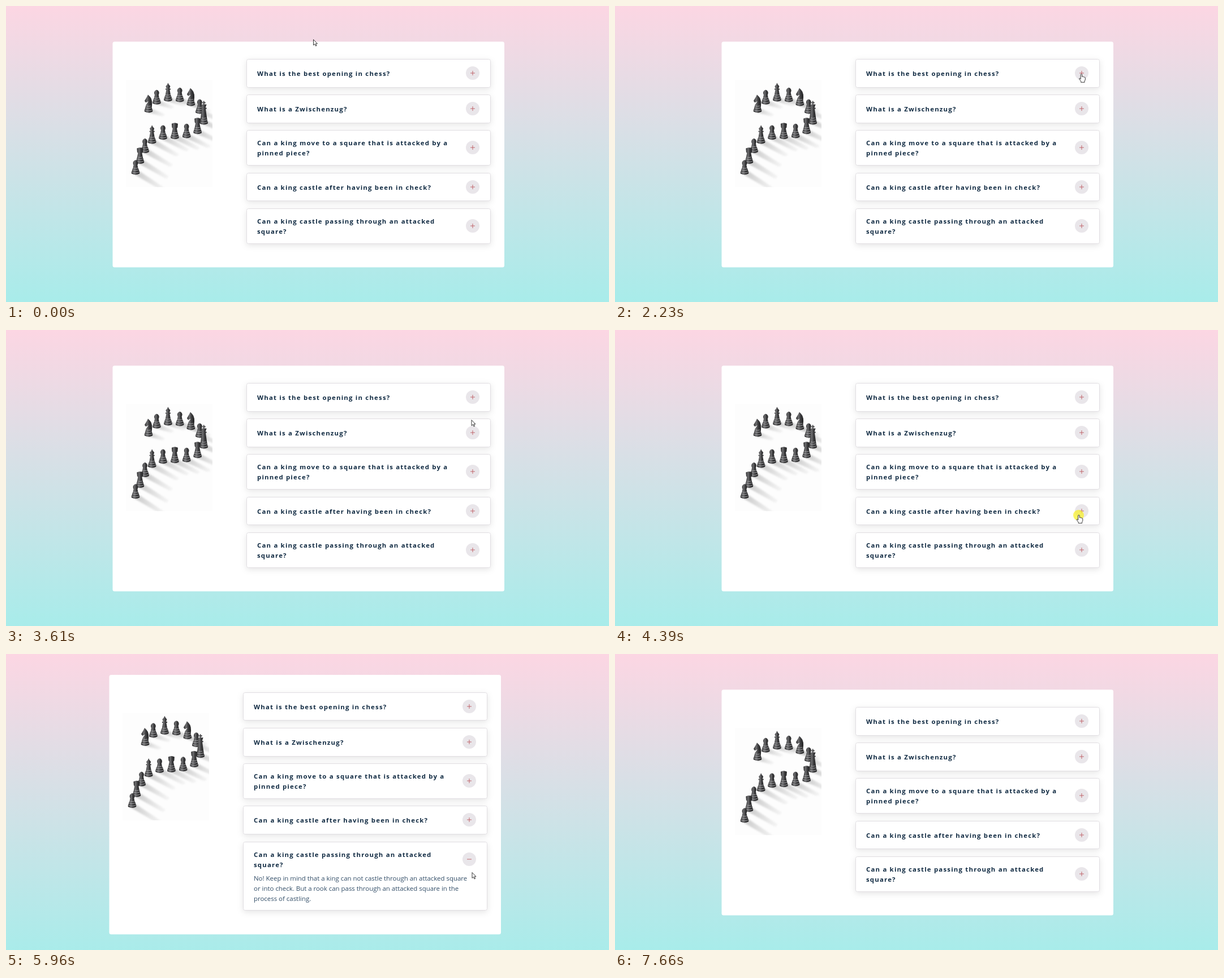
An HTML page that plays this animation: 1066 px wide and 525 px high, repeating every 7890 ms.

```html
<!DOCTYPE html>
<html lang="en">
<head>
<meta charset="utf-8">
<title>Chess questions</title>
<style>
  html, body { margin: 0; width: 100%; height: 100%; overflow: hidden; }
  svg { display: block; width: 1066px; height: 525px; }
  text { font-family: "Open Sans", "Noto Sans", sans-serif; }
  .title { font-size: 11.4px; font-weight: 700; letter-spacing: 1.2px; fill: #102a42; }
  .answer { font-size: 11.45px; fill: #324d67; }
  .box { fill: #fff; stroke: #e1dee2; filter: drop-shadow(0 3.75px 5.5px rgba(0, 0, 0, .1)); }
  .icon { stroke: #b5474c; stroke-width: 1; opacity: .8; }
  #shades { fill: url(#fade); filter: blur(1.4px); }
  #pieces { fill: url(#ebony); }
  .shine { fill: none; stroke: #b4b4b6; stroke-width: .8; }
</style>
</head>
<body>
<svg viewBox="0 0 1066 525">
  <defs>
    <linearGradient id="sky" x2="0" y2="1">
      <stop stop-color="#fcd6e3"/><stop offset="1" stop-color="#a8ecea"/>
    </linearGradient>
    <linearGradient id="ebony">
      <stop stop-color="#2a2a2b"/><stop offset=".35" stop-color="#707072"/>
      <stop offset=".6" stop-color="#3c3c3e"/><stop offset="1" stop-color="#232324"/>
    </linearGradient>
    <linearGradient id="fade">
      <stop stop-color="#777" stop-opacity=".4"/><stop offset="1" stop-color="#999" stop-opacity=".08"/>
    </linearGradient>
    <clipPath id="frame"><rect x="24" y="68" width="153" height="190"/></clipPath>
  </defs>
  <rect id="back" width="1066" fill="url(#sky)"/>
  <g id="panel">
    <rect id="sheet" x=".5" width="692.5" rx="3.5" fill="#fff"/>
    <g clip-path="url(#frame)">
      <rect x="24" y="68" width="153" height="190" fill="#fdfdfd"/>
      <path id="curve" fill="none" d="M64 125C76 97 132 100 151 123C177 152 152 172 112 172C66 172 64 178 41 235"/>
      <g id="shades"></g>
      <g id="pieces"></g>
    </g>
  </g>
  <g id="cards"></g>
  <circle id="ring" r="9.5" fill="#f8f02c" opacity=".74"/>
  <g id="cursor" fill="#fff" stroke="#222" stroke-width=".9" stroke-linejoin="round">
    <path id="arrow" d="M0 0V10L2.4 7.9L4 11.5L5.6 10.8L4 7.3H7Z"/>
    <path id="hand" d="M-1.3 1Q0-.7 1.2 1V5Q2.2 4.1 3.2 5.2Q4.3 4.5 5.1 5.8Q6.4 5.2 6.8 6.8V10.5L5.6 12.7V14.8H-.8V13L-4 8.6Q-3.6 7.2-2.4 8L-1.3 9.2Z"/>
  </g>
</svg>
<script>
const LOOP = 7890, STAGE = 525, MARGIN = 37, LEFT = 188, GAP = 12.65, FLASH = 90;
const $ = id => document.getElementById(id);

function add(parent, tag, attrs, text) {
  const el = document.createElementNS("http://www.w3.org/2000/svg", tag);
  for (const key in attrs) el.setAttribute(key, attrs[key]);
  if (text) el.textContent = text;
  return parent.appendChild(el);
}
const move = (el, x, y) => el.setAttribute("transform", `translate(${x} ${y})`);
const show = (el, on) => el.setAttribute("visibility", on ? "visible" : "hidden");

// open: opening and closing time; aim: where the pointer rests on the button
const items = [
  { title: ["What is the best opening in chess?"], open: [1240, 2060], aim: [-.5, 1.5], answer: [
    "First of all, there’s no one correct answer, and it’s that your first move",
    "should be aligned with your playing style:There’s the tactical style and the",
    "strategical style, and for these, there are several “openings” you could",
    "apply.Up next I’ll leave you a list with the most famous openings in",
    "chess:Italian game, English opening, Queen’s pawn."] },
  { title: ["What is a Zwischenzug?"], open: [3010, 3610], aim: [-2, -1.5], answer: [
    "It’s an in-between move: a player makes a threat before the expected",
    "reply, and the opponent has to answer it first."] },
  { title: ["Can a king move to a square that is attacked by a", "pinned piece?"], answer: [] },
  { title: ["Can a king castle after having been in check?"], open: [4400, 4950], aim: [-5, 7], answer: [
    "Yes! A king that was in check earlier can still castle later in the game,",
    "as long as the check was answered without moving the king. The rook",
    "must not have moved either, and the king can not be in check at the",
    "moment of castling."] },
  { title: ["Can a king castle passing through an attacked", "square?"], open: [5820, 6820], aim: [-1, -2.5], answer: [
    "No! Keep in mind that a king can not castle through an attacked square",
    "or into check. But a rook can pass through an attacked square in the",
    "process of castling."] }
];
const used = items.filter(item => item.open);

for (const item of items) {
  const rows = item.title.length;
  item.head = 38.6 + 12 * rows;
  item.mid = 19 + 6 * (rows > 1 ? 2 : 1);
  item.grow = item.answer.length * 18 + 6;
  const g = item.el = add($("cards"), "g");
  item.box = add(g, "rect", { class: "box", x: .5, y: .5, width: 431, rx: 3 });
  item.title.forEach((line, i) =>
    add(g, "text", { class: "title", x: 19, y: item.mid + 5 + 18 * i - 9 * (rows - 1) }, line));
  item.body = add(g, "g");
  item.answer.forEach((line, i) =>
    add(item.body, "text", { class: "answer", x: 19, y: Math.round(item.head) + 6 + 18 * i }, line));
  add(g, "circle", { cx: 400, cy: item.mid, r: 12, fill: "#e9e6ea" });
  add(g, "path", { class: "icon", d: `M396 ${item.mid}h8` });
  item.bar = add(g, "path", { class: "icon", d: `M400 ${item.mid - 4}v8` });
}

// Each piece: height and head, drawn down from its top onto a common foot
const kinds = {
  p: [25, "M-3.4 9Q-6 4-2 .8Q0-.6 2 .8Q6 4 3.4 9L5 17H-5Z"],
  b: [32, "M-1 2Q0-2 1 2L4 6L2.5 10H4.5V12H3L5 24H-5L-3 12H-4.5V10H-2.5L-4 6Z"],
  r: [28, "M-5.5 1.5Q0-1.5 5.5 1.5L5 8L3.6 10L5.5 20H-5.5L-3.6 10L-5 8Z"],
  n: [31, "M-1 0L2 3Q8 9 5.5 23H-5.5Q-5 17 0 12L-5 14L-7 11L-3 4Z"],
  k: [41, "M-1 0H1V2H3V4H1V6H5L3 12H5V14H3.4L6 33H-6L-3.4 14H-5V12H-3L-5 6H-1V4H-3V2H-1Z"]
};
const foot = "M-7.2-4V-1Q0 3 7.2-1V-4Q6.5-6 6-6.5V-8Q5.4-10 4-10H-4Q-5.4-10-6-8V-6.5Q-6.5-6-7.2-4Z";
const shine = "M-6.8-4Q0-.6 6.8-4M-5.6-7.6Q0-5.4 5.6-7.6M-4-11Q0-9.6 4-11";

// The pieces stand evenly along a question mark
const order = [..."npbpnpkrprpbprp"];
order.forEach((kind, i) => {
  const k = i / (order.length - 1);
  const { x, y } = $("curve").getPointAtLength(k * $("curve").getTotalLength());
  const reach = 28 + 24 * k, drop = reach * (.25 + .3 * k);
  add($("shades"), "path", { d: `M${x - 3} ${y}L${x + reach - 6} ${y + drop}q7 1 6-4L${x + 6} ${y - 6}Z` });
  const g = add($("pieces"), "g"), [height, head] = kinds[kind];
  move(g, x, y);
  move(add(g, "path", { d: head }), 0, -height);
  add(g, "path", { d: foot });
  add(g, "path", { class: "shine", d: shine });
});

function layout(t) {
  const isOpen = ({ open }) => !!open && t >= open[0] && t < open[1];
  const height = items.reduce((sum, item) => sum + (isOpen(item) ? item.grow : 0), 400.25);
  const page = Math.max(STAGE, height + 2 * MARGIN);
  const left = page > STAGE ? LEFT - 6 : LEFT;
  const top = Math.max(MARGIN, 263.4 - height / 2);
  let y = top + 30.7;
  const cards = items.map(item => {
    const on = isOpen(item), from = Math.round(y), to = y + item.head + (on ? item.grow : 0);
    y = to + GAP;
    return { item, on, y: from, height: Math.round(to) - from, button: [left + 637, from + item.mid] };
  });
  return { height, page, left, top, cards };
}

// Rest point on an item's button as it stands at time t
function rest(item, t) {
  const card = layout(t).cards.find(c => c.item === item);
  return [LEFT + 637 + item.aim[0], card.button[1] + item.aim[1]];
}

// Pointer legs: start, end, point. It reaches a button before each click
// and follows the button back once its answer has closed.
const legs = [[70, 330, [650, 5]], [330, 680, [866, 168]]];
for (const item of used) {
  for (const time of item.open) legs.push([time - 560, time - 200, rest(item, time - 1)]);
  const shut = item.open[1];
  legs.push([shut, shut + 170, rest(item, shut)]);
}
legs.push([7000, 7180, [804, 231]], [7180, 7430, [1048, 508]], [7530, 7655, [1036, 532]]);

function pointer(t) {
  let x = 543.5, y = 59.5;
  for (const [from, to, goal] of legs) {
    if (t < from) break;
    const k = Math.min(1, (t - from) / (to - from));
    x += (goal[0] - x) * k;
    y += (goal[1] - y) * k;
  }
  return [x, y];
}

function render(t) {
  const { height, page, left, top, cards } = layout(t);
  const [px, py] = pointer(t);

  $("back").setAttribute("height", page);
  $("sheet").setAttribute("height", height);
  move($("panel"), left, top);
  for (const { item, on, y, height } of cards) {
    move(item.el, left + 237, y);
    item.box.setAttribute("height", height - 1);
    show(item.body, on);
    show(item.bar, !on);
  }

  const hover = cards.some(({ button: [x, y] }) => Math.hypot(px - x, py - y) < 12);
  show($("hand"), hover);
  show($("arrow"), !hover);
  move($("cursor"), px, py);
  move($("ring"), px - .5, py + .5);
  show($("ring"), used.some(({ open }) => open.some(time => t >= time - FLASH && t < time)));
}

const start = performance.now();
function tick() {
  render((performance.now() - start) % LOOP);
  requestAnimationFrame(tick);
}
render(0);
tick();
</script>
</body>
</html>
```
